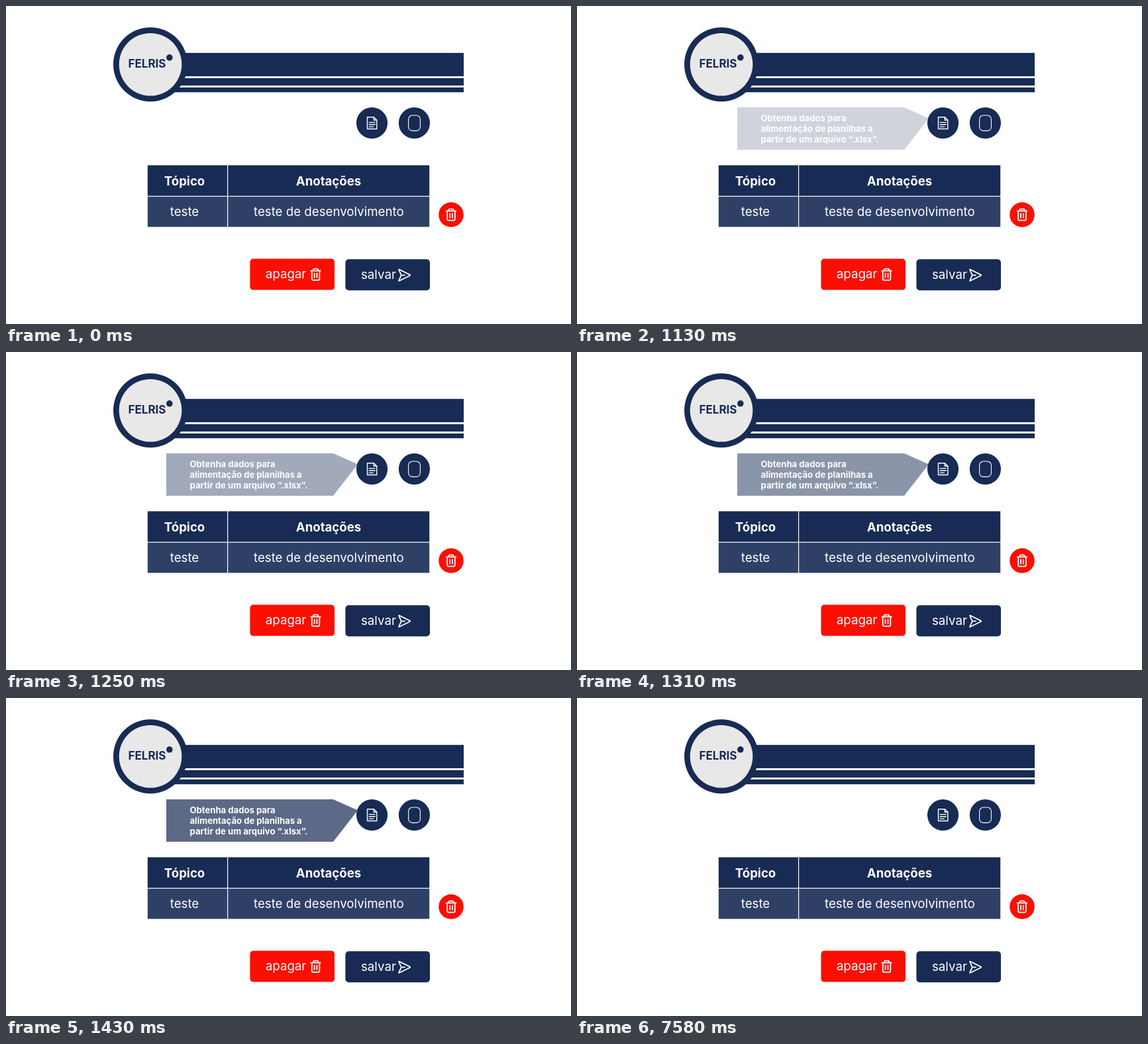
These frames come from a looping animation (853x480 px, 8 s). An HTML page:

```html
<!DOCTYPE html>
<html lang="pt">
<head>
<meta charset="utf-8">
<title>Anotações</title>
<style>
  html, body { margin: 0; width: 100%; height: 100%; overflow: hidden; background: #fff; }
  svg { display: block; width: 100%; height: 100%; }
  text { font: 400 18.7px Inter, Roboto, sans-serif; font-optical-sizing: none; fill: #fff; }
  .mid { text-anchor: middle; }
  .head { font-weight: 700; font-size: 18.6px; }
  .tip text { font-weight: 700; font-size: 13.1px; }
  .brand { font-weight: 700; font-size: 17px; fill: #172b54; }
  .navy { fill: #172b54; }
  .row { fill: #2f4066; }
  .red { fill: #fb0f00; }
  .line { fill: none; stroke: #fff; stroke-linecap: round; stroke-linejoin: round; }
</style>
</head>
<body>
<svg viewBox="0 0 853 480">
  <defs>
    <g id="trash" class="line" stroke-width="1.8">
      <path d="M-7.3 -5.6H7.3M-3.6 -5.6V-7.2Q-3.6 -8.6 -2.2 -8.6H2.2Q3.6 -8.6 3.6 -7.2V-5.6"/>
      <path d="M-5.8 -5.6V6.6Q-5.8 8.6 -3.8 8.6H3.8Q5.8 8.6 5.8 6.6V-5.6M-1.9 -1.5V4.6M1.9 -1.5V4.6"/>
    </g>
  </defs>

  <g class="navy">
    <rect x="218" y="70.8" width="473" height="35.2"/>
    <rect x="218" y="109" width="473" height="11"/>
    <rect x="218" y="123" width="473" height="7.2"/>
    <circle cx="218" cy="88.2" r="56"/>
  </g>
  <circle cx="218" cy="88.2" r="47.3" fill="#e8e8e8"/>
  <text class="brand mid" x="213" y="92.5">FELRIS</text>
  <circle class="navy" cx="246.8" cy="77.8" r="4.8"/>

  <g id="tip" class="tip" opacity="0">
    <path class="navy" d="M242 153H494L531 169.5L494 217H242Z"/>
    <text x="277.5" y="174">Obtenha dados para</text>
    <text x="277.5" y="190">alimentação de planilhas a</text>
    <text x="277.5" y="206">partir de um arquivo “.xlsx”.</text>
  </g>

  <g class="navy">
    <circle cx="552.5" cy="176.6" r="23.6"/>
    <circle cx="616.4" cy="176.6" r="23.6"/>
  </g>
  <g class="line">
    <path stroke-width="1.4" d="M545.5 167.8H555.3L559.8 172.3V185.5H545.5ZM555.3 167.8V172.3H559.8"/>
    <path stroke-width="1.3" d="M548.2 175.7H557.2M548.2 179H557.2M548.2 182.3H554.5"/>
    <rect stroke-width="1.1" x="607.6" y="165" width="17.8" height="23.4" rx="6"/>
  </g>

  <g class="navy">
    <rect x="213.8" y="240.4" width="120.2" height="46.2"/>
    <rect x="335.2" y="240.4" width="304" height="46.2"/>
  </g>
  <g class="row">
    <rect x="213.8" y="287.8" width="120.2" height="45.6"/>
    <rect x="335.2" y="287.8" width="304" height="45.6"/>
  </g>
  <text class="head mid" x="269.5" y="270.6">Tópico</text>
  <text class="head mid" x="487" y="270.6">Anotações</text>
  <text class="mid" x="269.5" y="317.3">teste</text>
  <text class="mid" x="487.3" y="317.3">teste de desenvolvimento</text>

  <circle class="red" cx="672" cy="315" r="18.8"/>
  <use href="#trash" x="672" y="315"/>

  <rect class="red" x="368.4" y="381.6" width="127.6" height="47" rx="5"/>
  <text x="391.8" y="411">apagar</text>
  <use href="#trash" x="467.5" y="405.2"/>

  <rect class="navy" x="512.4" y="382.2" width="127.6" height="47" rx="5"/>
  <text x="536" y="412">salvar</text>
  <path class="line" stroke-width="1.8" d="M593.2 398.4Q592.6 397.4 593.9 397.8L609.6 405.6Q610.8 406.3 609.6 407L593.9 414.8Q592.6 415.2 593.2 414.2L596.8 406.3ZM596.8 406.3H602"/>
</svg>
<script>
  const LOOP = 8000, START = 1070, STEP = 60, COUNT = 8, END = 7580;
  const key = (ms, opacity) => ({ offset: ms / LOOP, opacity, easing: 'steps(1, end)' });

  // The tip gains a tenth of opacity per step, holds, then vanishes at once.
  const fade = Array.from({ length: COUNT }, (_, i) => key(START + i * STEP, (i + 1) / 10));
  document.getElementById('tip').animate(
    [key(0, 0), ...fade, key(END, 0), key(LOOP, 0)],
    { duration: LOOP, iterations: Infinity }
  );
</script>
</body>
</html>
```
